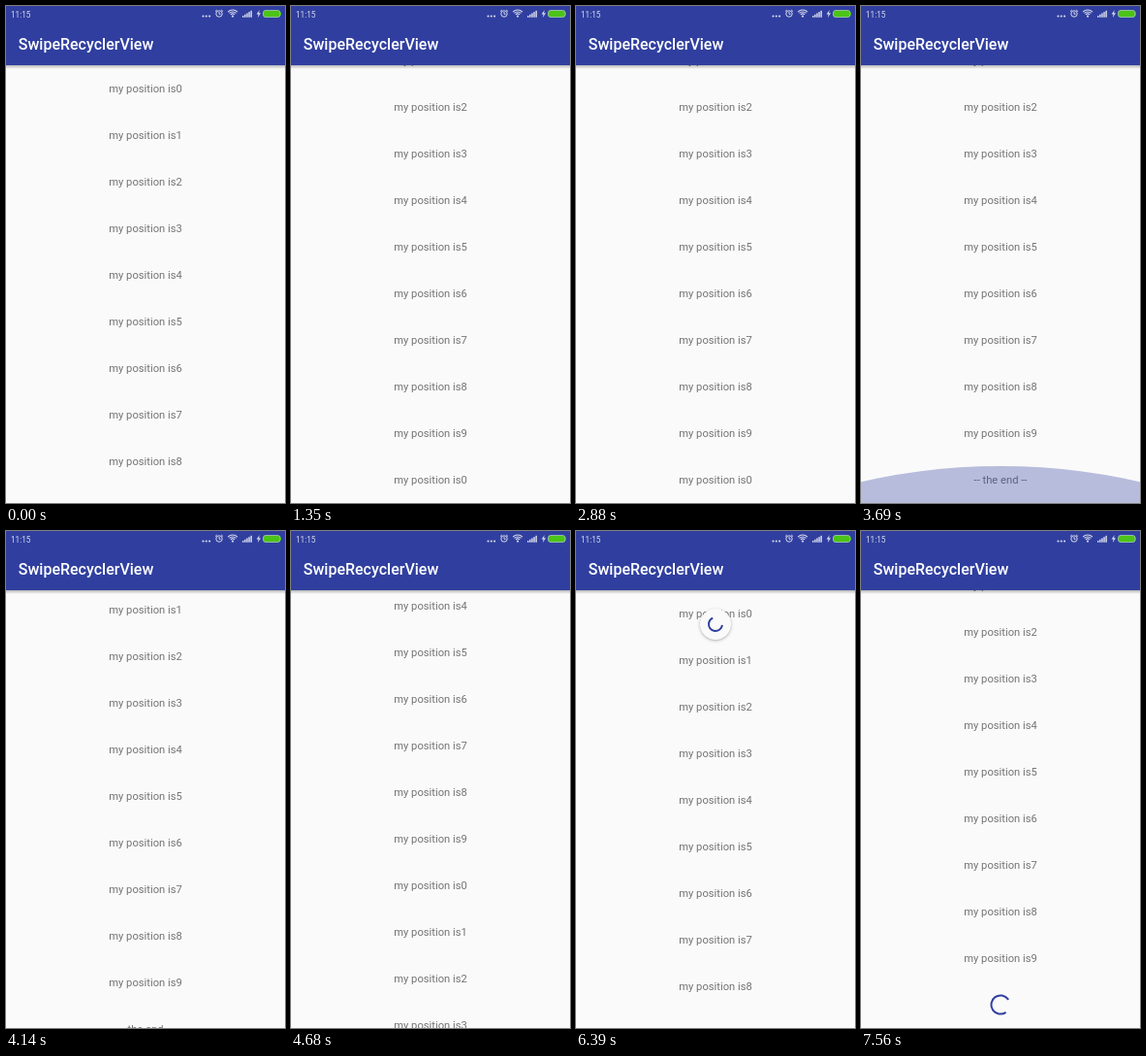
Animation, 288 px wide and 512 px high, one loop 7.65 s. Source, as an HTML page with a canvas:

```html
<!DOCTYPE html>
<html lang="en">
<head>
<meta charset="utf-8">
<title>SwipeRecyclerView</title>
<style>
  html, body { margin: 0; width: 100%; height: 100%; overflow: hidden; background: #fafafa; }
  canvas { display: block; }
</style>
</head>
<body>
<canvas id="stage" width="288" height="512"></canvas>
<script>
const ctx = document.getElementById('stage').getContext('2d');
const W = 288, H = 512, MID = W / 2, TAU = Math.PI * 2;
const BAR = 61, ROW = 48, LOOP = 7650, STEP = 90;
const INDIGO = '#303f9f', PAPER = '#fafafa', GREY = '#737373';

// Keyframes are [time in ms, value].
const SCROLL = [
  [270, 0], [360, 32], [450, 77], [1440, 77], [1530, 91], [1710, 91], [1980, 557],
  [3060, 557], [3150, 598], [3240, 598], [3510, 1037], [4050, 1037], [4140, 1012],
  [4410, 1012], [4680, 680], [5130, 0], [6750, 0], [6840, 32], [6930, 77]
];
const PULL = [[5400, 43], [5850, 147], [5940, 140], [6030, 96]];
const PULL_SIZE = [[6390, 1], [6570, 0]];

const clamp = x => Math.min(1, Math.max(0, x));

function track(keys, t) {
  const next = keys.findIndex(k => k[0] > t);
  if (next === 0) return keys[0][1];
  if (next < 0) return keys[keys.length - 1][1];
  const [t0, a] = keys[next - 1], [t1, b] = keys[next];
  return a + (b - a) * (t - t0) / (t1 - t0);
}

// cubic-bezier(.4, 0, .2, 1)
function ease(x) {
  let lo = 0, hi = 1;
  for (let i = 0; i < 20; i++) {
    const u = (lo + hi) / 2, v = 1 - u;
    if (1.2 * v * v * u + 0.6 * v * u * u + u ** 3 < x) lo = u; else hi = u;
  }
  return lo * lo * (3 - 2 * lo);
}

function text(str, x, y, font, color, align = 'left') {
  ctx.font = `${font} Roboto, sans-serif`;
  ctx.fillStyle = color;
  ctx.textAlign = align;
  ctx.fillText(str, x, y);
}

function dot(x, y, r, color) {
  ctx.fillStyle = color;
  ctx.beginPath();
  ctx.arc(x, y, r, 0, TAU);
  ctx.fill();
}

function arc(x, y, r, from, to, width, color) {
  ctx.strokeStyle = color;
  ctx.lineWidth = width;
  ctx.beginPath();
  ctx.arc(x, y, r, from * TAU, to * TAU);
  ctx.stroke();
}

// Indeterminate ring; angles in turns.
function spinner(x, y, r, elapsed, turn = 0) {
  const p = elapsed / 1333 % 1;
  const base = turn - 0.25 + 2 * elapsed / 4444 + 0.25 * p;
  const head = 0.75 * ease(clamp(2 * p)), tail = 0.75 * ease(clamp(2 * p - 1));
  arc(x, y, r, base + tail, base + head + 0.01, 2, INDIGO);
}

function drawList(t) {
  const scroll = track(SCROLL, t);
  const count = t < 1350 || t >= 6570 ? 10 : t < 2880 ? 20 : 30;
  const first = Math.max(0, Math.floor(scroll / ROW) - 1);
  for (let i = first; i <= count; i++) {
    const y = BAR + ROW * (i + 0.5) - scroll;
    if (y > H + ROW / 2) break;
    if (i < count) text('my position is' + i % 10, MID, y + 4, '11.2px', GREY, 'center');
    else if (count === 30) text('-- the end --', MID, y + 4, '11.2px', GREY, 'center');
    else {
      const start = t < 1350 ? 450 : t < 2880 ? 1980 : 6930;
      spinner(MID, y, 9.6, Math.max(0, t - start));
    }
  }
}

// Overscroll glow: grows quickly, then recedes.
function glow(t, peak, atBottom) {
  const g = t < peak ? clamp(1 - (peak - t) / 135) : clamp(1 - (t - peak) / 500) ** 2;
  if (!g) return;
  const R = 432, depth = 58;
  ctx.save();
  ctx.translate(MID, atBottom ? H : BAR);
  ctx.scale(1, atBottom ? g : -g);
  ctx.globalAlpha = g / 2;
  dot(0, R - depth, R, INDIGO);
  ctx.restore();
}

function drawRefresh(t) {
  const size = track(PULL_SIZE, t);
  if (t < 5400 || !size) return;
  ctx.save();
  ctx.translate(MID, track(PULL, t));
  ctx.scale(size, size);
  ctx.shadowColor = 'rgba(0,0,0,.3)';
  ctx.shadowBlur = 3;
  ctx.shadowOffsetY = 1;
  dot(0, 0, 16, PAPER);
  ctx.shadowColor = 'transparent';
  if (t < 5940) {
    const p = clamp((t - 5400) / 450), start = -0.35 + 0.4 * p, end = start + 0.8 * p;
    ctx.globalAlpha = 0.3 + 0.7 * p * p;
    arc(0, 0, 7, start, end, 2, INDIGO);
    ctx.rotate(end * TAU);
    ctx.fillStyle = INDIGO;
    ctx.beginPath();
    ctx.moveTo(7 - 4 * p, 0);
    ctx.lineTo(7 + 4 * p, 0);
    ctx.lineTo(7, 4 * p);
    ctx.fill();
  } else {
    spinner(0, 0, 7, t - 5593, -1 / 3);
  }
  ctx.restore();
}

function drawStatus() {
  const ink = '#d5d8ec';
  text('11:15', 5, 11.5, '8.2px', ink);
  for (const x of [203.5, 206.8, 210.1]) dot(x, 10.5, 1.1, ink);

  arc(220, 8, 3.2, 0, 1, 1, ink);
  ctx.beginPath();
  ctx.moveTo(220, 6); ctx.lineTo(220, 8.3); ctx.lineTo(221.6, 8.3);
  ctx.moveTo(216, 5.6); ctx.lineTo(217.8, 4);
  ctx.moveTo(224, 5.6); ctx.lineTo(222.2, 4);
  ctx.stroke();

  for (const r of [3, 5, 7]) arc(234, 11, r, 0.625, 0.875, 1.1, ink);
  dot(234, 10.6, 1.1, ink);

  ctx.fillStyle = ink;
  for (let i = 0; i < 5; i++) ctx.fillRect(244 + i * 2.1, 10 - i * 1.3, 1.5, 1.7 + i * 1.3);

  ctx.beginPath();
  ctx.moveTo(261.8, 4); ctx.lineTo(258.6, 8.6); ctx.lineTo(260.6, 8.6);
  ctx.lineTo(259.8, 12); ctx.lineTo(263, 7.2); ctx.lineTo(261, 7.2);
  ctx.fill();

  ctx.fillStyle = '#4cc417';
  ctx.strokeStyle = '#a9c9b8';
  ctx.lineWidth = 0.8;
  ctx.beginPath();
  ctx.roundRect(265.5, 4.5, 17.5, 7, 2.5);
  ctx.fill();
  ctx.stroke();
  ctx.fillRect(283, 6.5, 1, 3);
}

function drawHeader() {
  const shade = ctx.createLinearGradient(0, BAR, 0, BAR + 4);
  shade.addColorStop(0, 'rgba(0,0,0,.27)');
  shade.addColorStop(1, 'rgba(0,0,0,0)');
  ctx.fillStyle = shade;
  ctx.fillRect(0, BAR, W, 4);
  ctx.fillStyle = INDIGO;
  ctx.fillRect(0, 0, W, BAR);
  text('SwipeRecyclerView', 12.8, 44.5, '500 16px', '#fff');
  drawStatus();
}

function frame() {
  const t = Math.floor(performance.now() % LOOP / STEP) * STEP;
  ctx.fillStyle = PAPER;
  ctx.fillRect(0, 0, W, H);
  drawList(t);
  glow(t, 2050, true);
  glow(t, 3595, true);
  glow(t, 5240, false);
  drawRefresh(t);
  drawHeader();
  requestAnimationFrame(frame);
}
frame();
</script>
</body>
</html>
```
